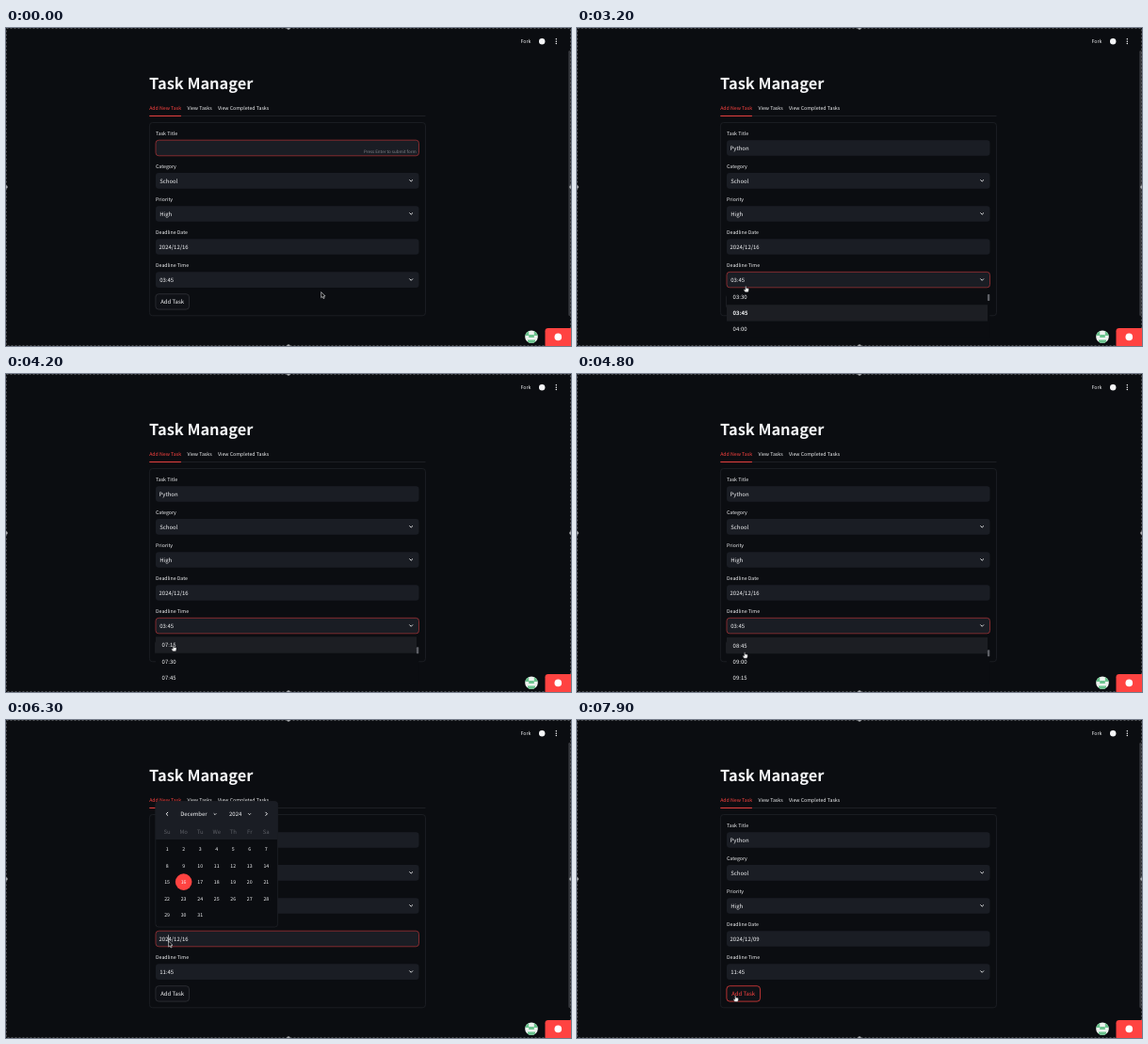
An HTML page for the animation above (8000 ms loop, 600x338 px).

```html
<!DOCTYPE html>
<html lang="en">
<head>
<meta charset="utf-8">
<title>Task Manager</title>
<style>
html, body { margin: 0; width: 100%; height: 100%; overflow: hidden; background: #0b0d11; }
svg { display: block; width: 100vw; height: 100vh; }
text { font-family: "Noto Sans CJK JP", "Noto Sans CJK SC", "Noto Sans CJK", "Open Sans", sans-serif; font-weight: 500; fill: #f4f5f7; white-space: pre; text-rendering: geometricPrecision; }
</style>
</head>
<body>
<svg id="stage" viewBox="0 0 600 338" preserveAspectRatio="none"></svg>
<script>
const BG = '#0b0d11', FIELD = '#1a1d24', RED = '#ff4341', EDGE = '#b43638', LINE = '#22242a';
const BODY = 5.97, SMALL = 5.23, LOOP = 8000;
const ROW = 17.4, LIST_TOP = 277;

const text = (x, y, s, size = SMALL, attrs = '') =>
  `<text x="${x}" y="${y}" font-size="${size}" ${attrs}>${s}</text>`;
const box = (x, y, w, h, r, attrs) =>
  `<rect x="${x}" y="${y}" width="${w}" height="${h}" rx="${r}" ${attrs}/>`;
const chevron = (x, y, w = 1.8, turn = 0, sw = .9) =>
  `<path d="M${-w} ${-w / 2}L0 ${w / 2}L${w} ${-w / 2}" transform="translate(${x} ${y}) rotate(${turn})"
    fill="none" stroke="#f4f5f7" stroke-width="${sw}"/>`;
const mid = 'text-anchor="middle"';

function field(id, y, label, value, select) {
  return text(159, y - 13.5, label) +
    box(159, y - 8.3, 279.5, 16.6, 3.2, `id="${id}Box" fill="${FIELD}" stroke-width=".7"`) +
    text(select ? 163.2 : 162.5, y + 2.1, value, BODY, `id="${id}"`) +
    (select ? chevron(430.2, y - .2) : '');
}

function calendar() {
  const col = i => 171.1 + i * 17.53;
  let s = box(158.8, 86.6, 129.8, 133.4, 3.2, `fill="${BG}" stroke="#22242a" stroke-width=".7"`) +
    `<path d="M158.8 127V89.8a3.2 3.2 0 0 1 3.2-3.2h123.4a3.2 3.2 0 0 1 3.2 3.2V127z" fill="${FIELD}"/>` +
    chevron(171.1, 99.8, 1.9, 90, 1) + chevron(276.5, 99.8, 1.9, -90, 1) +
    text(185.2, 101.9, 'December', BODY) + chevron(222, 100, 1.3) +
    text(237, 101.9, '2024', BODY) + chevron(258.6, 100, 1.3);
  ['Su', 'Mo', 'Tu', 'We', 'Th', 'Fr', 'Sa'].forEach((d, i) => {
    s += text(col(i), 121, d, BODY, mid + ' style="fill:#5c5e65"');
  });
  s += `<circle cx="${col(1)}" cy="172.1" r="8.8" fill="${RED}"/>`;
  for (let d = 1; d < 32; d++)
    s += text(col((d - 1) % 7), 139 + Math.floor((d - 1) / 7) * 17.53, d, SMALL, mid);
  return s;
}

const frame = `<rect x=".5" y=".5" width="599" height="337" fill="none" stroke="#6b6d70" stroke-width=".7" stroke-dasharray="2 2"/>` +
  [[300, 0], [0, 169], [600, 169], [300, 338]]
    .map(([x, y]) => `<circle cx="${x}" cy="${y}" r="1.8" fill="#a9abae"/>`).join('');

const stage = document.getElementById('stage');
stage.innerHTML =
  `<defs><clipPath id="listClip">${box(159, 276.7, 279.5, 51.6, 0, '')}</clipPath>
   <clipPath id="face"><circle cx="558" cy="328.3" r="6.8"/></clipPath></defs>` +
  box(0, 0, 600, 338, 0, `fill="${BG}"`) +
  box(597.3, 24, 2.4, 282, 1.2, 'id="bar" fill="#36383d"') + frame +
  text(546.5, 16.2, 'Fork') +
  '<circle cx="569.2" cy="14.2" r="3.2" fill="#f4f5f7"/>' +
  [11.8, 14.2, 16.6].map(y => `<circle cx="584.3" cy="${y}" r=".75" fill="#f4f5f7"/>`).join('') +
  text(152, 65, 'Task Manager', 16.4, 'style="font-weight:700"') +
  text(152.2, 86.7, 'Add New Task', SMALL, `style="fill:${RED}"`) +
  text(192.5, 86.7, 'View Tasks') + text(225, 86.7, 'View Completed Tasks') +
  box(152.3, 93.1, 293.2, .8, 0, `fill="${LINE}"`) +
  box(152.3, 93, 33.6, .9, 0, `fill="${RED}"`) +
  box(152.4, 100.5, 293.1, 205.3, 3.3, `fill="none" stroke="${LINE}" stroke-width=".7"`) +
  field('title', 127.5, 'Task Title', '', false) +
  text(435.6, 133.2, 'Press Enter to submit form', 4.5, 'id="hint" text-anchor="end" style="fill:#83858b;font-weight:400"') +
  field('cat', 162.4, 'Category', 'School', true) +
  field('prio', 197.5, 'Priority', 'High', true) +
  field('date', 232.5, 'Deadline Date', '2024/12/16', false) +
  field('time', 267.6, 'Deadline Time', '03:45', true) +
  box(158.9, 282.7, 35.6, 16.4, 3.3, 'id="addBox" fill="#0f1116" stroke-width=".7"') +
  text(176.6, 293.2, 'Add Task', BODY, `id="add" ${mid}`) +
  '<rect id="caret" width=".6" height="8" fill="#f4f5f7"/>' +
  `<g id="list" clip-path="url(#listClip)">${box(159, 276, 279.5, 53, 0, `fill="${BG}"`)}
    <rect id="hover" x="159" width="277" height="${ROW}" fill="#1c1e23"/>` +
    [0, 1, 2, 3, 4].map(() => text(165.6, 0, '', BODY, 'class="opt"')).join('') +
    '<rect id="thumb" x="435.9" width="2.6" height="7" rx=".8" fill="#5d5f65"/></g>' +
  `<g id="cal">${calendar()}</g>` +
  '<circle cx="558" cy="328.3" r="6.8" fill="#eef3ef"/>' +
  `<g clip-path="url(#face)" fill="#6cc48f">${box(551, 321, 4.2, 6, 0, '')}${box(560.8, 321, 4.2, 6, 0, '')}
    ${box(555.2, 326, 5.6, 3, 0, '')}${box(554, 331.5, 8, 4, 0, '')}</g>` +
  `<path d="M572.5 338V322.3a3.3 3.3 0 0 1 3.3-3.3H600V338z" fill="${RED}"/>` +
  '<circle cx="586.3" cy="328.4" r="3.8" fill="#fff"/>' +
  `<path id="arrow" d="M0 0V6.1L1.4 4.8L2.4 7L3.5 6.5L2.5 4.4H4.4Z" fill="#08090b" stroke="#e8e9eb" stroke-width=".6"/>
   <path id="hand" d="M-.6 .3Q0 -.5 .6 .3V2.2Q2.9 1.8 3.2 3V4.6Q2.9 6.3 2.2 6.5H-.5Q-1.5 5.5 -2.2 3.9Q-1.9 3 -.6 4Z"
     fill="#f5f5f5" stroke="#15161a" stroke-width=".5"/>`;

const $ = id => document.getElementById(id);
const opts = [...document.querySelectorAll('.opt')];
const show = (id, on) => $(id).setAttribute('visibility', on ? 'visible' : 'hidden');
const set = (id, name, v) => $(id).setAttribute(name, v);

// time, then values to blend
const MOUSE = [
  [0, 334.7, 280.6], [2200, 193, 196], [2300, 193, 197], [2500, 193, 199], [2900, 180, 267],
  [3100, 180, 268], [3400, 177.7, 287], [3900, 177.7, 287], [4200, 177.8, 288.3], [4700, 178, 289],
  [5100, 178.3, 316], [5600, 178.3, 316], [6100, 172.6, 235], [6500, 172.6, 235],
  [6800, 188, 155], [6900, 188, 155], [7300, 184, 292], [7500, 184, 292], [7900, 168.2, 293]
];
const SCROLL = [[3700, 243.8], [4200, 502.3], [4500, 560], [4700, 560], [5200, 790.8]];
const TYPED = [[1000, 'P'], [1100, 'Py'], [1200, 'Pyt'], [1400, 'Pyth'], [1700, 'Pytho'], [2000, 'Python']];

function blend(steps, t) {
  const i = steps.findIndex(s => s[0] > t);
  if (i === 0) return steps[0].slice(1);
  if (i < 0) return steps[steps.length - 1].slice(1);
  const a = steps[i - 1], b = steps[i], k = (t - a[0]) / (b[0] - a[0]);
  return a.slice(1).map((v, j) => v + (b[j + 1] - v) * k);
}

const clock = i => {
  const two = n => String(n).padStart(2, '0');
  return two(Math.floor(i / 4)) + ':' + two(i % 4 * 15);
};

function drawList(t, my) {
  const s = blend(SCROLL, t)[0];
  const first = Math.floor(s / ROW);
  const rowY = i => LIST_TOP + i * ROW - s;
  const over = my > LIST_TOP ? Math.floor((my - LIST_TOP + s) / ROW) : 15;
  set('hover', 'y', rowY(over));
  set('thumb', 'y', 283 + (s - 243.8) * .0285);
  opts.forEach((o, j) => {
    const i = first + j;
    o.textContent = clock(i);
    o.setAttribute('y', rowY(i) + ROW / 2 + 2.1);
    o.style.fontWeight = i === 15 ? 700 : 500;
  });
}

function render(t) {
  const within = (a, b) => t >= a && t < b;
  const [mx, my] = within(0, 2200) ? MOUSE[0].slice(1) : blend(MOUSE, t);

  const typed = TYPED.filter(s => s[0] <= t).pop();
  $('title').textContent = typed ? typed[1] : '';
  $('date').textContent = t < 6900 ? '2024/12/16' : '2024/12/09';
  $('time').textContent = t < 5400 ? '03:45' : '11:45';

  const focus = { title: t < 2900, time: within(2900, 6200), date: within(6200, 6900) };
  for (const id in focus) set(id + 'Box', 'stroke', focus[id] ? EDGE : 'none');
  show('hint', focus.title);
  show('bar', !within(3400, 5400));

  const typing = within(1000, 2300), calOpen = within(6200, 6900);
  show('caret', typing || calOpen);
  const end = typing ? 162.5 + $('title').getComputedTextLength() : 172.4;
  set('caret', 'x', end);
  set('caret', 'y', typing ? 123.4 : 228.4);

  const listOpen = within(3000, 5400);
  $('list').style.display = listOpen ? '' : 'none';
  if (listOpen) drawList(t, my);
  $('cal').style.display = calOpen ? '' : 'none';

  const onAdd = t >= 7300;
  set('addBox', 'stroke', onAdd ? RED : '#35373d');
  $('add').style.fill = onAdd ? RED : '';

  const hand = within(2800, 5200) || within(6700, 6900) || onAdd;
  const visible = !within(1000, 2200);
  show('arrow', visible && !hand);
  show('hand', visible && hand);
  for (const id of ['arrow', 'hand']) set(id, 'transform', `translate(${mx} ${my})`);
}

const start = performance.now();
function tick(now) {
  const t = Math.max(0, now - start) % LOOP;
  render(Math.floor(t / 100) * 100);
  requestAnimationFrame(tick);
}
render(0);
requestAnimationFrame(tick);
</script>
</body>
</html>
```
